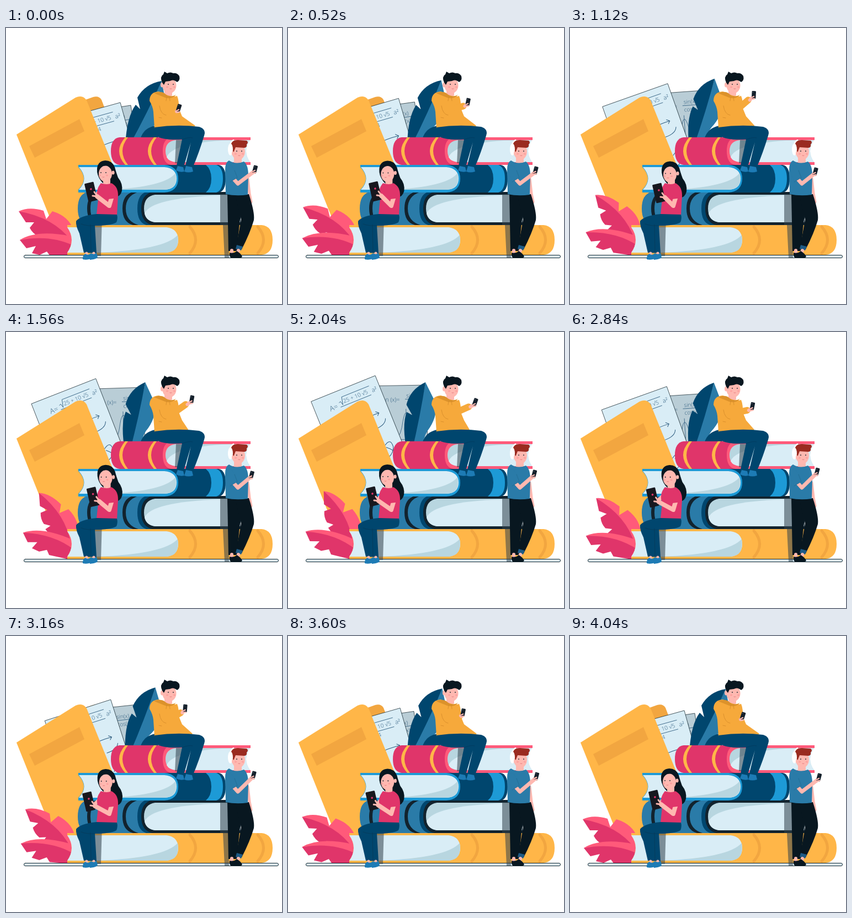
An HTML page with a canvas for the animation above (4080 ms loop, 500x500 px).

```html
<!DOCTYPE html>
<html lang="en">
<head>
<meta charset="utf-8">
<title>Reading on books</title>
<style>
html, body { margin: 0; width: 100%; height: 100%; overflow: hidden; background: #fff; }
canvas { display: block; width: 500px; height: 500px; }
</style>
</head>
<body>
<canvas id="stage"></canvas>
<script>
const LOOP = 4080, STEP = 40, SWING = 2000;
const C = {
  gold: '#ffb648', amber: '#f2a640', pink: '#e0356a', rose: '#ff5a7a', navy: '#00466e',
  blue: '#2a7ba8', sky: '#1d9ad6', page: '#d9edf6', fold: '#b8d6e0', back: '#b9cdd6',
  ink: '#12232e', black: '#081720', pen: '#2b5a7d', rim: '#14262e',
  skin: '#ffb8b0', hood: '#f6a93b', shade: 'rgba(50,66,76,.55)'
};
const cv = document.getElementById('stage');
const g = cv.getContext('2d');
const dpr = window.devicePixelRatio || 1;
cv.width = cv.height = 500 * dpr;

const fill = (color, d) => { g.fillStyle = color; g.fill(new Path2D(d)); };
const line = (color, w, d) => {
  g.strokeStyle = color; g.lineWidth = w;
  g.lineCap = g.lineJoin = 'round';
  g.stroke(new Path2D(d));
};
const oval = (color, x, y, rx, ry = rx) => {
  g.fillStyle = color; g.beginPath(); g.ellipse(x, y, rx, ry, 0, 0, 7); g.fill();
};
const box = (color, x, y, w, h, r) => {
  g.fillStyle = color; g.beginPath(); g.roundRect(x, y, w, h, r); g.fill();
};
const write = (s, x, y, size) => {
  g.fillStyle = C.pen;
  g.font = `300 ${size}px "Open Sans", "Noto Sans", sans-serif`;
  g.fillText(s, x, y);
};
const at = (x, y, deg, draw) => {
  g.save(); g.translate(x, y); g.rotate(deg * Math.PI / 180); draw(); g.restore();
};
const turn = (x, y, deg, draw) => at(x, y, deg, () => { g.translate(-x, -y); draw(); });
const mix = (a, b, p) => a + (b - a) * p;

// There and back with a quadratic ease, then a short rest.
function swing(t) {
  const u = Math.max(0, 1 - Math.abs(t - SWING) / SWING);
  return u < .5 ? 2 * u * u : 1 - 2 * (1 - u) * (1 - u);
}

// Smooth curve through hand positions at fixed moments.
const MOMENTS = [0, 520, 1120, 2040, 2520, 3160, 4040];
function follow(v, t) {
  const n = MOMENTS.length - 1;
  if (t >= MOMENTS[n]) return v[0];
  const val = i => v[i % n];
  const slope = i => i === 0 || i === n ? 0 :
    (val(i + 1) - val(i - 1)) / (MOMENTS[i + 1] - MOMENTS[i - 1]);
  let i = 0;
  while (t >= MOMENTS[i + 1]) i++;
  const h = MOMENTS[i + 1] - MOMENTS[i], u = (t - MOMENTS[i]) / h, w = 1 - u;
  return (1 + 2 * u) * w * w * val(i) + u * w * w * h * slope(i) +
    u * u * (3 - 2 * u) * val(i + 1) - u * u * w * h * slope(i + 1);
}

function sheet(color, w, h) {
  g.fillStyle = color;
  g.fillRect(-w, 0, w, h);
  g.strokeStyle = C.rim; g.lineWidth = .7;
  g.strokeRect(-w, 0, w, h);
}

function rearPaper(p) {
  at(mix(226, 251, p), mix(140, 96, p), mix(-9, -1, p), () => {
    sheet(C.back, 95, 130);
    write('tan (x)=', -84, 29, 10.5);
    write('sin(x)', -37, 22, 10);
    write('cos(x)', -37, 36, 10);
    line(C.pen, .8, 'M-39 25H-7M-38 43V105M-62 98H-10M-56 95Q-48 92-44 65Q-38 34-31 65Q-27 90-18 94');
  });
}

function frontPaper(p) {
  at(mix(207, 158, p), mix(135, 79, p), mix(-15.5, -22, p), () => {
    sheet(C.page, 125, 180);
    write('A=', -99, 30, 13);
    write('25 + 10 √5', -71, 25, 10);
    write('4', -52, 40, 10);
    write('a²', -16, 26, 11);
    line(C.pen, .8, 'M-79 21L-76 20L-74 27L-71 13H-18M-79 29.5H-20');
    line(C.pen, 1, 'M-62 68Q-40 64-19 65M-24 61L-19 65L-23 69M-12 79Q-16 90-36 90');
    line(C.pen, 1, 'M-34 126Q-16 112-18 132Q-22 142-32 146M-30 128Q-20 136-14 150');
  });
}

function blueLeaf(p) {
  turn(247, 215, -15.5 * p, () => {
    fill(C.blue, 'M282 96L288 127L291 137Q285 165 262 182Q250 192 246 212H224Q258 145 282 96Z');
    fill(C.navy, 'M282 96Q252 101 238 126L243 147L235 139Q219 160 216 212H224Q258 150 282 96Z');
  });
  fill(C.navy, 'M270 177Q250 181 244 199H276Z');
}

function folder() {
  fill(C.gold, 'M19 193L126 126Q139 120 146 131L195 252L140 360H86Z');
  fill(C.amber, 'M42 214L133 165L142 187L52 235Z');
}

function pinkLeaves(p) {
  turn(120, 383, 32 * p, () => {
    fill(C.rose, 'M23 332Q42 323 68 331L73 346L84 332Q114 341 122 366L118 395Q88 348 23 332Z');
    fill(C.pink, 'M23 332L36 352L51 352L43 362Q48 372 58 377L70 374L65 384Q90 396 122 399L118 385Q86 343 23 332Z');
  });
  turn(120, 400, 14 * p, () => {
    fill(C.rose, 'M25 384Q56 365 116 377L124 400Q76 379 25 384Z');
    fill(C.pink, 'M25 384L37 399L54 395L47 408L61 411L74 405L80 413H122V394Q80 374 25 384Z');
  });
}

function pinkBook() {
  fill(C.pink, 'M206 198H300V248H206Q190 246 190 223Q190 200 206 198Z');
  fill(C.rose, 'M300 198H443V203H308V243H443V248H300Q284 246 284 223Q284 200 300 198Z');
  for (const x of [205, 257])
    fill(C.gold, `M${x + 11} 198Q${x - 11} 223 ${x + 11} 248H${x + 16}Q${x - 4} 223 ${x + 16} 198Z`);
  fill(C.fold, 'M308 203H442Q428 223 442 243H308Q289 241 289 223Q289 205 308 203Z');
  fill(C.page, 'M291 234Q300 210 390 204L442 203Q428 223 442 243H308Q295 242 291 234Z');
  fill(C.shade, 'M308 203H322L314 245H306Z');
}

function blueBook() {
  fill(C.navy, 'M285 248H385Q398 250 398 273Q398 296 385 298H285Z');
  fill(C.sky, 'M362 248H381Q393 252 393 273Q393 294 381 298H362Q372 290 372 273Q372 256 362 248Z');
  fill(C.sky, 'M131 248H287Q312 250 312 273Q312 296 287 298H131V293Q151 273 131 252Z');
  fill(C.page, 'M132 252H287Q309 254 309 273Q309 292 287 293H132Q151 273 132 252Z');
  fill(C.fold, 'M185 293Q288 288 307 263Q313 292 287 293Z');
}

function darkBook() {
  fill(C.blue, 'M148 297H262V357H148Q130 353 130 327Q130 301 148 297Z');
  fill(C.ink, 'M164 297H170Q153 304 153 327Q153 350 170 357H164Q147 350 147 327Q147 304 164 297Z');
  fill(C.navy, 'M254 297H268V357H254Q238 352 238 327Q238 302 254 297Z');
  fill(C.ink, 'M230 297H240Q217 304 217 327Q217 350 240 357H230Q211 352 211 327Q211 302 230 297Z');
  fill(C.ink, 'M266 297H425V357H266Q245 353 245 327Q245 301 266 297Z');
  fill(C.fold, 'M270 302H424V352H270Q250 349 250 327Q250 305 270 302Z');
  fill(C.page, 'M251 336Q262 308 390 303H424V352H270Q254 350 251 336Z');
}

function goldBook() {
  fill(C.gold, 'M111 357H463Q483 359 483 384Q483 409 463 411H111V407Q127 384 111 361Z');
  for (const x of [345, 468])
    line(C.amber, 5, `M${x - 12} 360Q${x + 9} 384 ${x - 12} 408`);
  fill(C.page, 'M111 361H291Q312 364 312 384Q312 404 291 407H111Q127 384 111 361Z');
  fill(C.fold, 'M165 407Q288 402 311 375Q316 405 291 407Z');
}

function floor() {
  box(C.page, 32.5, 411.5, 461, 5, 2.5);
  g.strokeStyle = C.rim; g.lineWidth = 1; g.stroke();
}

function face(x, y) {
  for (const dx of [-4, 5]) oval(C.ink, x + dx, y, .9, 1.1);
  oval('#fda09e', x - 6, y + 5, 2, 1.5);
  oval('#fda09e', x + 7, y + 5, 2, 1.5);
  line('#d85e67', .7, `M${x - 1} ${y + 8}q2 1 3 0`);
}

function phone(x, y, deg) {
  at(x, y, deg, () => {
    box('#15202b', -3.7, -7, 7.4, 14, 1.3);
    oval('#5d7180', -1.7, -4.5, .7);
  });
}

function girl(t) {
  const x = follow([154, 158, 161, 153, 150, 150], t);
  const y = follow([297, 296, 299, 298, 299, 300], t);
  const nod = follow([0, .5, 1.5, 0, .7, 1], t);
  fill(C.shade, 'M158 350L174 343L172 413H162Z');
  at(nod * .7, nod, 0, () => {
    fill(C.black, 'M180 240Q166 241 165 255Q164 266 172 277L198 306Q207 306 210 295Q212 282 203 271Q199 260 197 252Q192 240 180 240Z');
    fill(C.skin, 'M176 272H189V284Q181 289 176 283Z');
    oval(C.skin, 180, 264, 12, 14.5);
    fill(C.black, 'M166 263Q167 250 182 249Q193 251 195 262Q199 247 187 242Q170 239 166 254Z');
    oval(C.skin, 194, 262, 2.6, 3.6);
    face(176, 262);
  });
  line(C.skin, 7, `M170 296L${x + 8} ${y + 7}`);
  fill(C.pink, 'M172 281Q183 285 191 281Q203 287 203 303L201 340L164 338L167 310Q161 294 172 281Z');
  fill(C.navy, 'M201 338L164 337Q134 340 127 350Q126 358 133 372L141 407L164 408L161 358Q190 358 200 352Q203 345 201 338Z');
  line('#063b5c', .9, 'M153 356L154 406M161 358Q146 359 136 355');
  line(C.skin, 5, 'M146 408v5M159 408v4');
  fill('#1d7bb5', 'M143 409Q150 413 153 408L154 418Q146 421 139 419Q138 414 143 409Z');
  fill('#1d7bb5', 'M154 408Q161 412 163 407Q167 412 165 417Q158 420 152 420Q150 414 154 408Z');
  at(x, y, -13, () => {
    box('#17181f', -8.5, -17, 17, 34, 1.5);
    oval(C.pink, 1, -5, 1.8);
  });
  line(C.skin, 8, `M192 305L187 322L${x + 11} ${y + 8}`);
  line(C.skin, 3, `M${x + 11} ${y + 7}l-5 -7M${x + 11} ${y + 8}l-8 -1`);
  fill(C.pink, 'M188 286Q201 287 203 308L185 310Z');
}

function sitter(t, p) {
  const x = follow([313, 326, 333, 339, 336, 324.5], t);
  const y = follow([145, 134, 121, 127, 138, 131], t);
  const a = follow([18, 12, 3, 20, 20, 5], t);
  const tip = mix(343, 329, p);
  fill(C.skin, 'M287 111H301V122Q294 128 287 121Z');
  oval(C.skin, 296, 104, 12.5, 14.5);
  oval(C.skin, 283, 103, 3, 4.5);
  fill(C.black, 'M283 99Q278 88 285 84L287 79L292 82Q298 79 303 82Q310 81 314 87Q316 95 310 98Q303 92 297 96L289 97L286 103Z');
  face(298, 102);
  fill(C.hood, `M310 138L319 160L${tip} 177L${tip - 5} 181H300Z`);
  fill(C.hood, 'M277 115Q260 116 260 132Q266 142 267 152L269 182H318L313 150Q314 132 310 123Q300 127 277 115Z');
  fill('#dc922b', 'M268 118Q281 113 288 119Q296 127 308 121Q300 130 288 126Z');
  line('#d48b2a', .8, 'M278 141Q280 156 290 158M282 163L277 162M296 124l1 8M291 125l-1 7');
  fill(C.navy, 'M269 180Q310 174 350 179Q363 183 359 195Q350 225 339 251L325 249L335 207L322 251L309 249L319 202Q285 204 271 195Z');
  line('#003a5e', .8, 'M319 202Q332 197 338 199');
  fill('#1d7bb5', 'M311 250L321 252L323 260Q315 262 308 258Z');
  fill('#1d7bb5', 'M326 250L337 252L339 260Q330 263 323 260Z');
  const hx = x - 4, hy = y + 6, cx = mix(304, hx, .75), cy = mix(150, hy, .85);
  line(C.hood, 12, `M306 145L${cx} ${cy}`);
  line(C.skin, 6, `M${cx + 3} ${cy}L${hx} ${hy}`);
  phone(x, y, a);
  line(C.skin, 2.5, `M${hx} ${hy - 1}l4 -2M${hx} ${hy + 2}l5 -1`);
}

function stander(t) {
  const x = follow([451, 448.5, 444.5, 446, 446.5, 448.5], t);
  const y = follow([256, 258, 260, 257, 255, 252], t);
  fill(C.shade, 'M388 301H403L404 416H396L393 357H388Z');
  line(C.skin, 5, 'M438 273L441 300L444 315');
  fill(C.black, 'M401 301H426L424 345L418 404H403Z');
  fill(C.black, 'M415 301H440Q451 335 449 348Q442 372 427 401L417 396L426 347L419 318Z');
  fill('#1d5a85', 'M418 393L429 396L426 403L416 400Z');
  line(C.skin, 6, 'M409 403v5M421 403l-2 5');
  fill(C.black, 'M405 407Q413 409 418 404Q425 408 428 414Q427 417 420 416H407Q404 412 405 407Z');
  fill(C.skin, 'M413 234H427V246Q420 251 413 245Z');
  oval(C.skin, 421, 224, 12, 15);
  fill('#9a2b20', 'M406 216Q406 203 420 203L436 204Q440 207 436 211Q437 217 431 217L416 216L412 226L408 224Z');
  line('#fff', 2.5, 'M406 217Q405 207 412 203');
  oval('#fff', 406.5, 220, 4.5, 11);
  oval(C.skin, 411, 227, 2, 3.5);
  face(422, 223);
  fill(C.blue, 'M404 240Q416 248 431 242Q439 248 439 268L438 302Q417 305 398 301L397 257Q397 243 404 240Z');
  line(C.skin, 7, `M411 272L420 282L${x - 3} ${y + 5}`);
  fill(C.blue, 'M398 251Q408 245 414 257L419 271L406 279Z');
  line('#226b94', .8, 'M414 258L419 271L406 279');
  phone(x, y, 15);
  line(C.skin, 2.5, `M${x - 4} ${y + 4}l4 -2M${x - 4} ${y + 7}l5 -1`);
}

function draw(t) {
  const p = swing(t);
  g.setTransform(dpr, 0, 0, dpr, 0, 0);
  g.fillStyle = '#fff';
  g.fillRect(0, 0, 500, 500);
  fill(C.amber, 'M144 130L158 125Q168 122 173 130L215 240H120Z');
  rearPaper(p);
  frontPaper(p);
  blueLeaf(p);
  folder();
  pinkLeaves(p);
  goldBook();
  darkBook();
  blueBook();
  pinkBook();
  floor();
  sitter(t, p);
  girl(t);
  stander(t);
}

const start = performance.now();
function tick() {
  const t = Math.max(0, performance.now() - start) % LOOP;
  draw(Math.floor(t / STEP) * STEP);
  requestAnimationFrame(tick);
}
tick();
</script>
</body>
</html>
```
